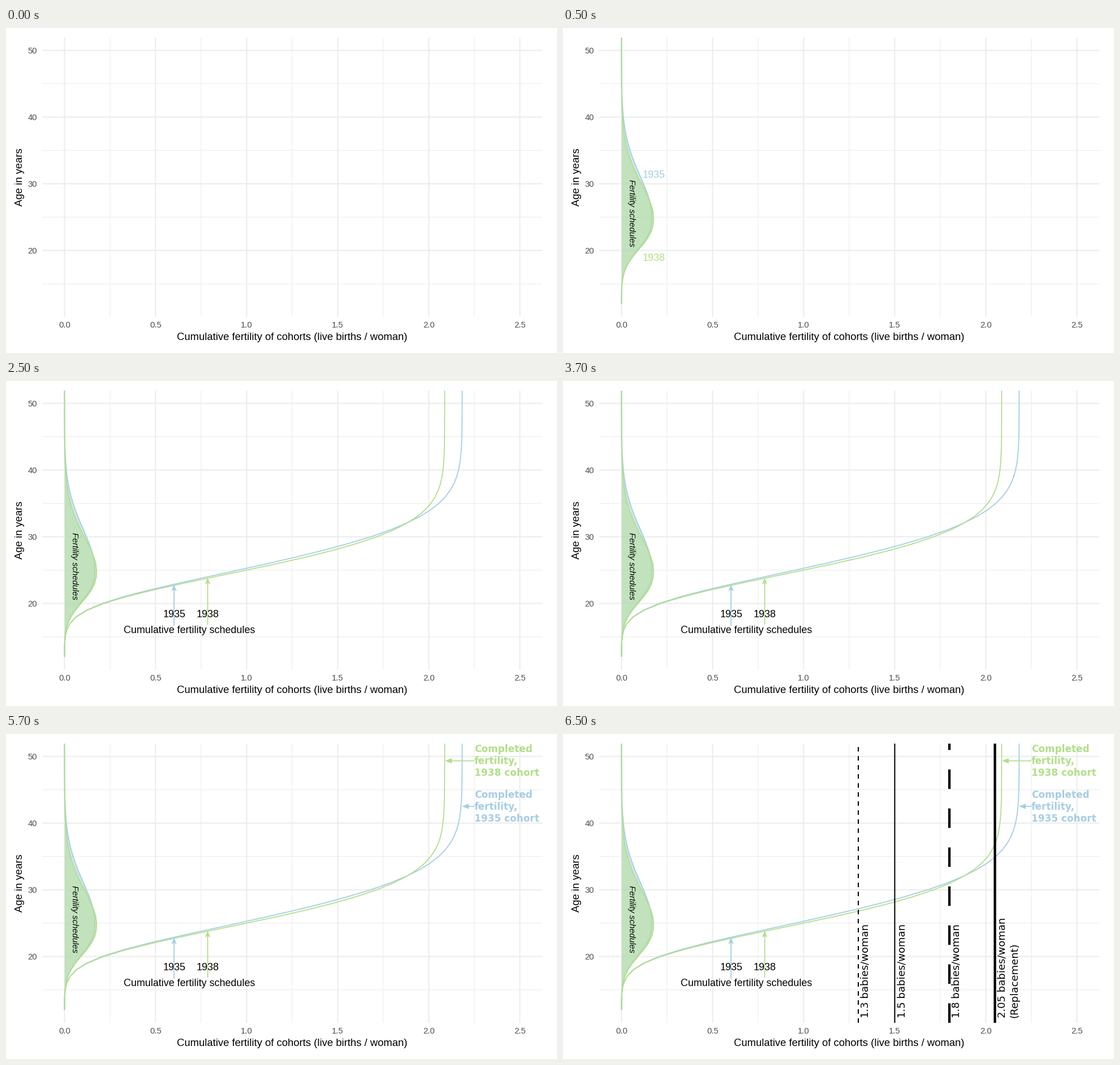
Recreate the animation shown at these times as a matplotlib script. Size 974x575 px, loop 8 s.

```python
import numpy as np
import matplotlib.pyplot as plt
from matplotlib.animation import FuncAnimation

WIDTH, HEIGHT, DPI = 974, 575, 100
PT = 72 / DPI
STEP_MS, LOOP_MS = 500, 8000
LEFT, RIGHT, TOP, BOTTOM = 63.5, 948, 17, 511
BLUE, GREEN = "#a6cee3", "#b2df8a"
SANS, WIDE = "Liberation Sans", "DejaVu Sans"
AGES = np.arange(12, 53)
PEAK_AGE = 25

fig = plt.figure(figsize=(WIDTH / DPI, HEIGHT / DPI), dpi=DPI, facecolor="white")
ax = fig.add_axes([0, 0, 1, 1])
ax.set_xlim(0, WIDTH)
ax.set_ylim(HEIGHT, 0)
ax.axis("off")
panel = plt.Rectangle((LEFT, TOP), RIGHT - LEFT, BOTTOM - TOP, transform=ax.transData)


def fertility(total, rise, fall, tail):
    """Births per woman at each age: a two-sided bell that sums to total."""
    gap = AGES - PEAK_AGE
    bell = np.where(gap < 0, np.exp(-np.abs(gap / rise) ** 2.6),
                    np.exp(-np.abs(gap / fall) ** tail))
    return total * bell / bell.sum()


COHORTS = [
    (fertility(2.183, 5.85, 8.85, 1.95), BLUE),
    (fertility(2.087, 5.83, 7.5, 1.8), GREEN),
]


def px(births):
    return 103.4 + 322 * np.asarray(births)


def py(age):
    return 393.6 - 11.8 * (np.asarray(age) - 20)


def line(xs, ys, color, width, **kw):
    artist, = ax.plot(xs, ys, color=color, lw=width * PT, snap=False,
                      solid_capstyle="butt", dash_capstyle="butt", **kw)
    artist.set_clip_path(panel)
    return artist


def text(x, y, label, size, color="black", font=SANS, **kw):
    kw = {"va": "baseline", "rotation_mode": "anchor", **kw}
    return ax.text(x, y, label, fontsize=size * PT, color=color, family=font, **kw)


def arrow(start, tip, color, notch):
    """Line with a filled head; notch is how far the head's back is cut in."""
    start, tip = np.array(start, float), np.array(tip, float)
    along = (tip - start) / np.hypot(*(tip - start))
    side = np.array([-along[1], along[0]])
    back = tip - 12 * along
    inner = back + notch * along
    shaft = line(*zip(start, inner), color, 1.8, zorder=5)
    head = plt.Polygon([tip, back + 4.7 * side, inner, back - 4.7 * side],
                       fc=color, lw=0, zorder=5)
    return [shaft, ax.add_patch(head)]


def draw_grid():
    for half in range(11):
        births, width = half / 4, 1 if half % 2 else 1.9
        line([px(births)] * 2, [TOP, BOTTOM], "#ebebeb", width, zorder=0)
        if half % 2 == 0:
            text(px(births), 529.7, f"{births:.1f}", 14.8, "#4d4d4d", ha="center")
    for age in range(15, 51, 5):
        width = 1 if age % 10 else 1.9
        line([LEFT, RIGHT], [py(age)] * 2, "#ebebeb", width, zorder=0)
        if age % 10 == 0:
            text(55, py(age) + 5.4, str(age), 14.8, "#4d4d4d", ha="right")
    text(505.7, 552, "Cumulative fertility of cohorts (live births / woman)",
         18.45, ha="center")
    text(29, 264, "Age in years", 18.45, ha="center", rotation=90)


def draw_schedules():
    artists = []
    for rates, color in COHORTS:
        area = ax.fill_betweenx(py(AGES), px(0), px(rates), color=color,
                                alpha=0.5, lw=0, zorder=2)
        area.set_clip_path(panel)
        artists += [area, line(px(rates), py(AGES), color, 1.9, zorder=2)]
    artists.append(text(116.5, 268, "Fertility schedules", 14.9, style="italic",
                        rotation=-90, zorder=6))
    return artists


def draw_cohort_labels():
    return [text(141, 265.3, "1935", 17.85, BLUE), text(141, 411.5, "1938", 17.85, GREEN)]


def draw_cumulative():
    artists = [line(px(np.cumsum(rates)), py(AGES), color, 1.8, zorder=3)
               for rates, color in COHORTS]
    artists += arrow((297, 433), (297, 360), BLUE, 3)
    artists += arrow((356.5, 431), (356.5, 348), GREEN, 3)
    for x, y, label in ((297.7, 418.3, "1935"), (356.5, 418.3, "1938"),
                        (323.7, 446.3, "Cumulative fertility schedules")):
        artists.append(text(x, y, label, 17.85, ha="center", zorder=6))
    return artists


def draw_completed():
    artists = []
    for year, color, tip, y, baseline in ((1938, GREEN, 776, 47.5, 32),
                                          (1935, BLUE, 806, 128, 113)):
        artists += arrow((828, y), (tip, y), color, 0)
        for row, label in enumerate(("Completed", "fertility,", f"{year} cohort")):
            artists.append(text(828, baseline + 21 * row, label, 16.9, color, WIDE,
                                weight="bold", zorder=6))
    return artists


def draw_thresholds():
    artists = []
    for births, width, dash in ((1.3, 2, 4), (1.5, 2, 0), (1.8, 4.31, 8), (2.05, 4.31, 0)):
        style = (0, (dash, dash)) if dash else "-"
        artists.append(line([px(births)] * 2, [BOTTOM, TOP], "black", width,
                            ls=style, zorder=7))
        artists.append(text(px(births) + 17.8, 502, f"{births} babies/woman",
                            18.05, font=WIDE, rotation=90, zorder=8))
    artists.append(text(803.5, 502, "(Replacement)", 18.05, font=WIDE,
                        rotation=90, zorder=8))
    return artists


draw_grid()
# Each group of artists is visible from its start until its end time
STAGES = [
    (500, LOOP_MS, draw_schedules()),
    (500, 2500, draw_cohort_labels()),
    (2500, LOOP_MS, draw_cumulative()),
    (4500, LOOP_MS, draw_completed()),
    (6500, LOOP_MS, draw_thresholds()),
]


def update(frame):
    now = frame * STEP_MS
    for start, end, artists in STAGES:
        for artist in artists:
            artist.set_visible(start <= now < end)
    return []


anim = FuncAnimation(fig, update, frames=LOOP_MS // STEP_MS, interval=STEP_MS,
                     repeat=True, repeat_delay=0, blit=False)
plt.show()
```
